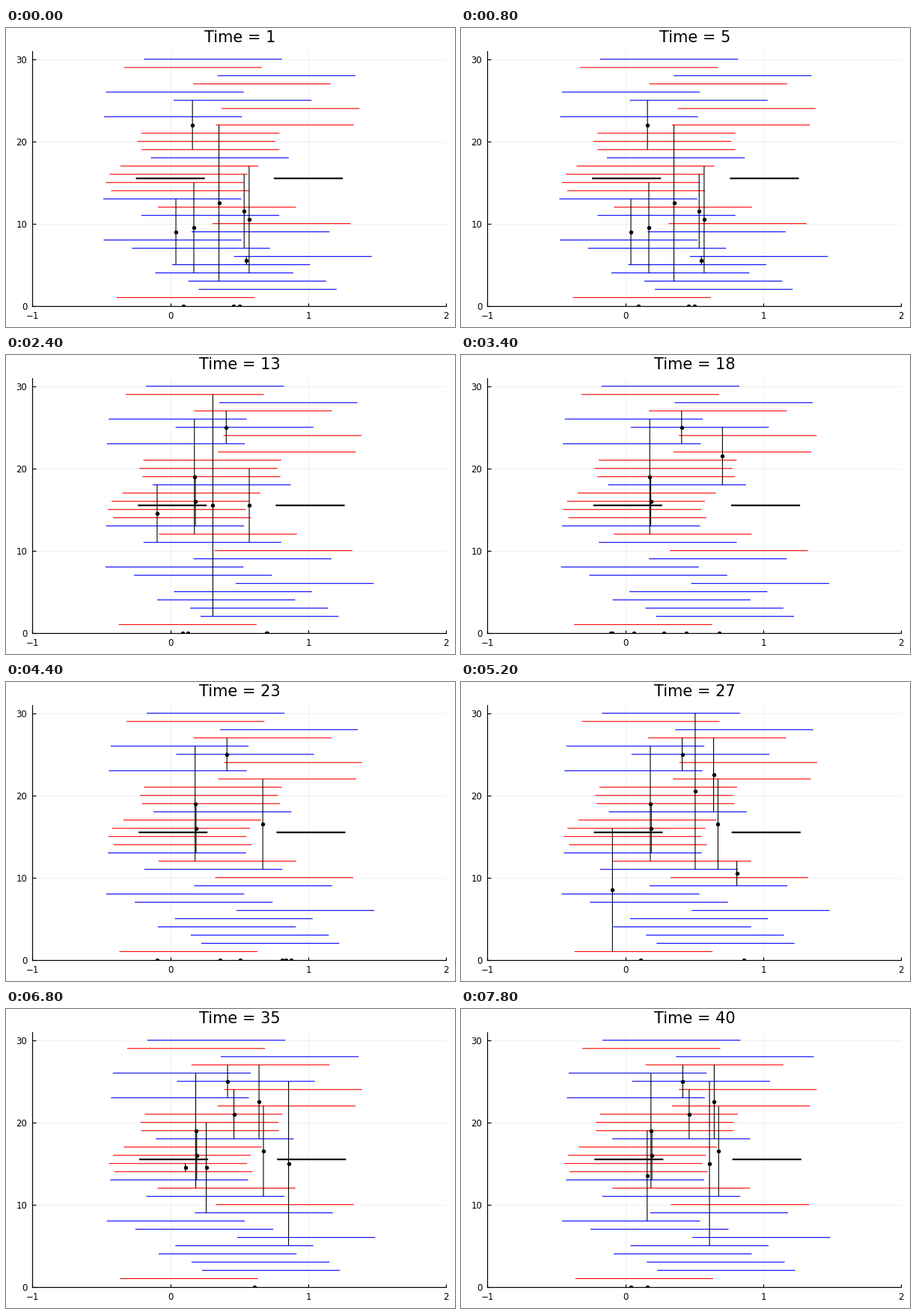
A matplotlib script for the animation above (8000 ms loop, 600 px wide and 400 px high).

```python
import numpy as np
import matplotlib.pyplot as plt
from matplotlib.animation import FuncAnimation
from matplotlib.collections import LineCollection

W, H, DPI = 600, 400, 100
PX = 72 / DPI                      # one pixel in points
LEFT, RIGHT, TOP, BOTTOM = 35.4, 588.2, 30.8, 371.6
UNIT = (RIGHT - LEFT) / 3          # pixels per x unit
STEPS, WAVE = 40, 5                # motors rebind once per wave
MOTORS = 10
SLIDE = 0.17 / UNIT                # pull of a steady motor per step

# Left end of each filament in pixels, bottom row first
STARTS = [148, 257.5, 243.5, 199.5, 222, 304.5, 168.5, 130.5, 248, 276,
          181, 203, 130, 140.5, 133.5, 138.5, 153, 193.5, 181, 175.5,
          181, 280.5, 131, 288, 224, 133.5, 250, 282.5, 157.5, 184.5]
X0 = (np.array(STARTS) - LEFT) / UNIT - 1
ROWS = np.arange(1, 31)
RED_ROWS = [1, 10, 12, *range(14, 18), *range(19, 23), 24, 27, 29]
SIGN = np.where(np.isin(ROWS, RED_ROWS), -1, 1)

# Lasting bonds, which slide their filaments: first wave, x, two rows
STEADY = [(1, .160, 12, 26), (1, .167, 13, 19), (1, .391, 23, 27),
          (4, .651, 11, 22), (5, .619, 18, 27), (6, .437, 18, 24)]

# Bonds that hold for a single wave: x, two rows
BRIEF = [
    [(.16, 19, 25), (.04, 5, 13), (.17, 4, 15), (.352, 3, 22),
     (.535, 7, 16), (.571, 4, 17), (.551, 5, 6)],
    [(.457, 14, 21)],
    [(-.096, 11, 18), (.308, 2, 29), (.572, 11, 20)],
    [(.704, 18, 25)],
    [],
    [(.506, 11, 30), (.808, 9, 12), (-.094, 1, 16)],
    [(.108, 14, 15), (.857, 5, 25), (.26, 9, 20)],
    [(.61, 5, 25), (.158, 8, 19)],
]


def drift(step):
    return 0.75 * np.sqrt(step - 1) / UNIT


def filament_x(step):
    x = X0 + drift(step)
    for wave, _, *rows in STEADY:
        idx = np.array(rows) - 1
        x[idx] += SIGN[idx] * SLIDE * max(0, step - 1 - wave * WAVE)
    return x


def bonds(step):
    wave = (step - 1) // WAVE
    steady = [(x + drift(step), a, b) for w, x, a, b in STEADY if w <= wave]
    return steady + BRIEF[wave]


def waiting(step):
    """Free motors lie on the floor, first of all where they bind next."""
    wave = (step - 1) // WAVE
    rng = np.random.default_rng(wave)
    upcoming = [x for x, *_ in BRIEF[(wave + 1) % len(BRIEF)]]
    spots = upcoming + list(rng.uniform(-.2, .9, MOTORS))
    return spots[:MOTORS - len(bonds(step))]


fig = plt.figure(figsize=(W / DPI, H / DPI), dpi=DPI, facecolor="white")
ax = fig.add_axes([LEFT / W, 1 - BOTTOM / H,
                   (RIGHT - LEFT) / W, (BOTTOM - TOP) / H])
ax.set(xlim=(-1, 2), ylim=(0, 31))
ax.set_xticks(range(-1, 3))
ax.set_yticks(range(0, 31, 10))
ax.spines[["top", "right"]].set_visible(False)
ax.spines[["left", "bottom"]].set_linewidth(1.2 * PX)
ax.tick_params(direction="in", length=4.5 * PX, width=1.2 * PX, pad=7 * PX,
               labelsize=11.8 * PX, labelfontfamily="DejaVu Sans")
ax.set_axisbelow(True)
ax.grid(color="black", alpha=0.08, linewidth=0.8 * PX)

title = fig.text(312.3 / W, 1 - 18.7 / H, "", ha="center", va="baseline",
                 fontsize=20.85 * PX, family="DejaVu Sans")


def add_lines(colors, width, z):
    lines = LineCollection([], colors=colors, linewidths=width * PX,
                           capstyle="butt", zorder=z)
    lines.set_snap(False)
    return ax.add_collection(lines, autolim=False)


filaments = add_lines(np.where(SIGN < 0, "red", "blue"), 1.1, 3)
bars = add_lines("black", 2.1, 4)
links = add_lines("black", 1.1, 5)
dots, = ax.plot([], [], "o", color="black", markersize=5.4 * PX,
                markeredgewidth=0, zorder=6)


def draw(i):
    step = i + 1
    title.set_text(f"Time = {step}")
    filaments.set_segments([[(x, r), (x + 1, r)]
                            for x, r in zip(filament_x(step), ROWS)])
    bars.set_segments([[(x + drift(step), 15.5), (x + .5 + drift(step), 15.5)]
                       for x in (-.25, .75)])
    held = bonds(step)
    links.set_segments([[(x, a), (x, b)] for x, a, b in held])
    poses = [(x, (a + b) / 2) for x, a, b in held]
    poses += [(x, 0) for x in waiting(step)]
    dots.set_data(*zip(*poses))
    return title, filaments, bars, links, dots


anim = FuncAnimation(fig, draw, frames=STEPS, interval=200, repeat=True,
                     repeat_delay=0, blit=False)
plt.show()
```
